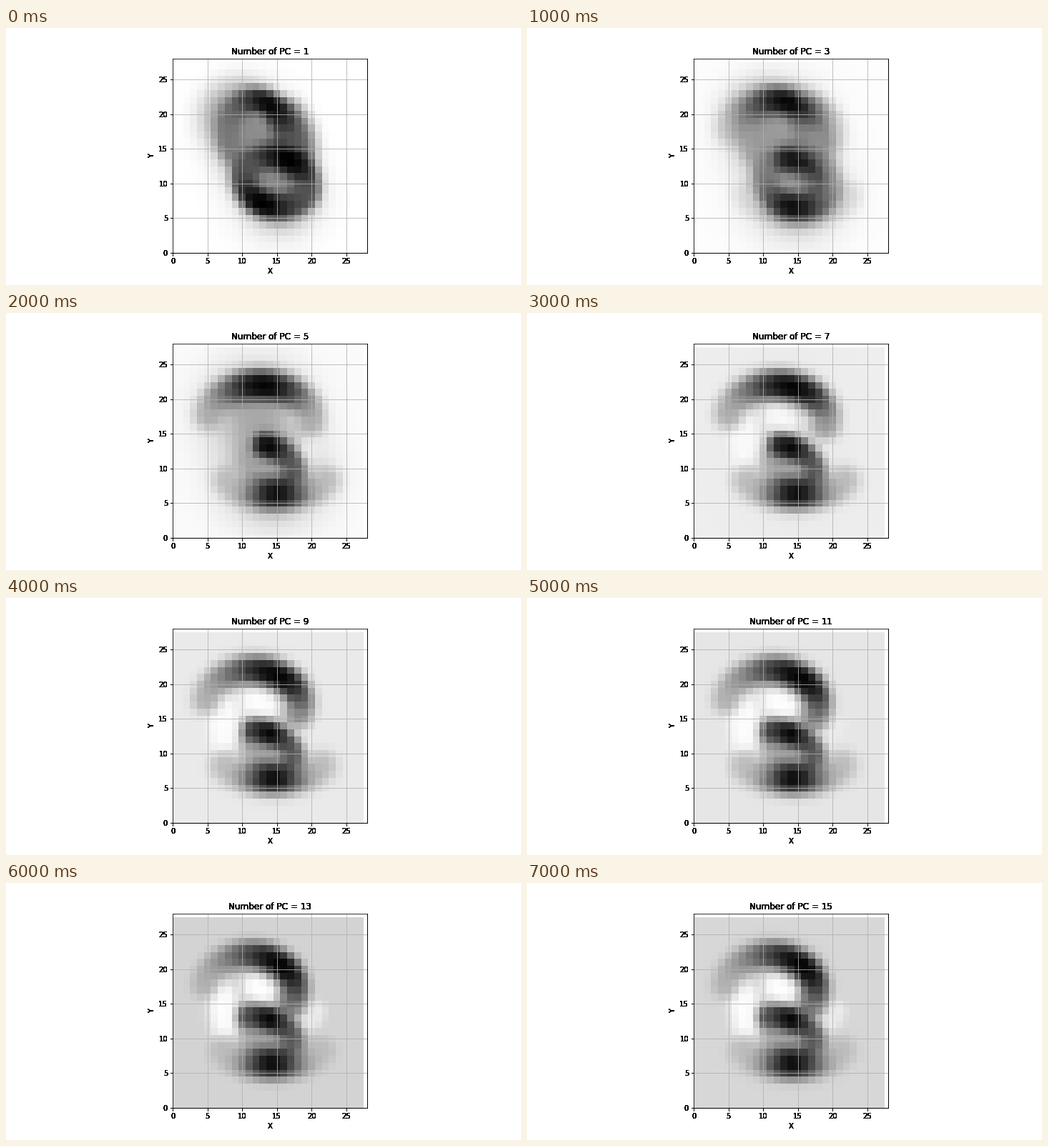
A matplotlib script that plays this animation: 720x360 px, repeating every 8000 ms.

```python
import numpy as np
import matplotlib.pyplot as plt
from matplotlib.animation import FuncAnimation

SIZE = 28
COLS, ROWS = np.meshgrid(np.arange(SIZE), np.arange(SIZE))
COUNTS = range(1, 16, 2)
GROUND = [0, .01, .02, .07, .085, .1, .17, .16]
LAYERS = 10


def lerp(a, b, t):
    return a + (b - a) * t


def ease_out(t, power):
    return 1 - (1 - t) ** power


def spray(tones, x, y, width, tone, strength=1):
    """Pull tones softly towards the tone of the nearest path point."""
    dist = np.hypot(COLS[..., None] - x, ROWS[..., None] - y)
    near = dist.argmin(axis=-1)
    mask = strength * np.exp(-(dist.min(axis=-1) / width) ** 3)
    tones += mask * (np.broadcast_to(tone, x.shape)[near] - tones)


def line(tones, x0, y0, x1, y1, width, tone, strength=1):
    spray(tones, np.linspace(x0, x1, 40), np.linspace(y0, y1, 40),
          width, tone, strength)


def arc(tones, center, radii, start, end, width, peak, spread, low, high,
        tilt=0):
    """Elliptic stroke that is darkest at the peak angle (degrees)."""
    angle = np.linspace(start, end, 80)
    u = radii[0] * np.cos(np.radians(angle))
    v = radii[1] * np.sin(np.radians(angle))
    c, s = np.cos(np.radians(tilt)), np.sin(np.radians(tilt))
    tone = low + (high - low) * np.exp(-((angle - peak) / spread) ** 2)
    spray(tones, center[0] + u * c - v * s, center[1] + u * s + v * c,
          width, tone)


def paint_blur(ground):
    """Slanted, closed shape: an average digit."""
    tones = np.full((SIZE, SIZE), float(ground))
    line(tones, 11, 18, 15, 8, 7.5, .09)
    line(tones, 9.5, 19.5, 15.5, 9, 5, .45)
    arc(tones, (13, 15), (5, 6), 50, -20, 2.7, 0, 90, .6, .62)
    arc(tones, (12, 17.3), (4, 4.7), 215, -40, 1.9, 60, 65, .52, .97)
    for turn in (75, 255):
        arc(tones, (14.8, 10.3), (4.5, 3.6), turn - 90, turn + 90, 2,
            turn, 55, .65, 1, tilt=-13)
    return tones


def paint_three(ground, t):
    """Figure three that tightens and opens up as t goes from 0 to 1."""
    move, opened = ease_out(t, 2), ease_out(t, 8)
    tones = np.full((SIZE, SIZE), float(ground))

    # Grey haze gives way to light hollows.
    line(tones, 12, 18, 14.5, 9, 8.7, .17, 1 - opened)
    line(tones, 12, 18, 14, 8, 4.5, .34, 1 - opened)
    line(tones, 7, 16, 7.8, 11.5, 2.2, .01, opened)
    line(tones, 12.2, 11, 13.5, 8.5, 2.8, .36)
    line(tones, 12, 17.5, 13, 16.8, 2, .01, opened)
    line(tones, 19.8, 12.5, 20.5, 14, 1.6, .08)

    # Upper bow, middle hook, base.
    arc(tones, (lerp(12.5, 11, move), 17), (lerp(7.3, 6.5, move), 5),
        170, lerp(0, -20, move), lerp(2.3, 2.1, move),
        lerp(85, 45, move), lerp(52, 70, move), .28, .98)
    arc(tones, (11.5, lerp(8.9, 8.5, move)), (6, 4.7),
        lerp(72, 95, move), 0, 1.9, 65, 25, .64, .96)
    arc(tones, (lerp(15, 14.3, move), 8.8), (7.2, 2.4), 195, 345, 2.3,
        270, 34, .26, .94)
    return tones


def digit(step):
    count = COUNTS[step]
    tones = paint_three(GROUND[step], max(count - 5, 0) / 10)
    blur = max(5 - count, 0) / 4
    return lerp(tones, paint_blur(GROUND[step]), blur)


plt.rcParams["font.family"] = "DejaVu Sans"
fig = plt.figure(figsize=(10, 5), dpi=72)
side = .755 * 360
box = [(369 - side / 2) / 720, .125, side / 720, .755]

# Stacked opaque axes: the lettering outside them builds up and looks heavy.
layers = [fig.add_axes(box, label=f"layer{i}") for i in range(LAYERS)]
for ax in layers:
    ax.set(xlabel="X", ylabel="Y", xlim=(0, SIZE), ylim=(0, SIZE),
           xticks=range(0, SIZE, 5), yticks=range(0, SIZE, 5))

top = layers[-1]
image = top.imshow(digit(0), cmap="binary", vmin=0, vmax=1, origin="lower",
                   interpolation="nearest", aspect="auto")
top.set(xlim=(0, SIZE), ylim=(0, SIZE))
top.grid(True)


def update(step):
    image.set_data(digit(step))
    for ax in layers:
        ax.set_title(f"Number of PC = {COUNTS[step]}")
    return [image]


anim = FuncAnimation(fig, update, frames=len(COUNTS), interval=1000,
                     repeat=True, repeat_delay=0, blit=False)
plt.show()
```
